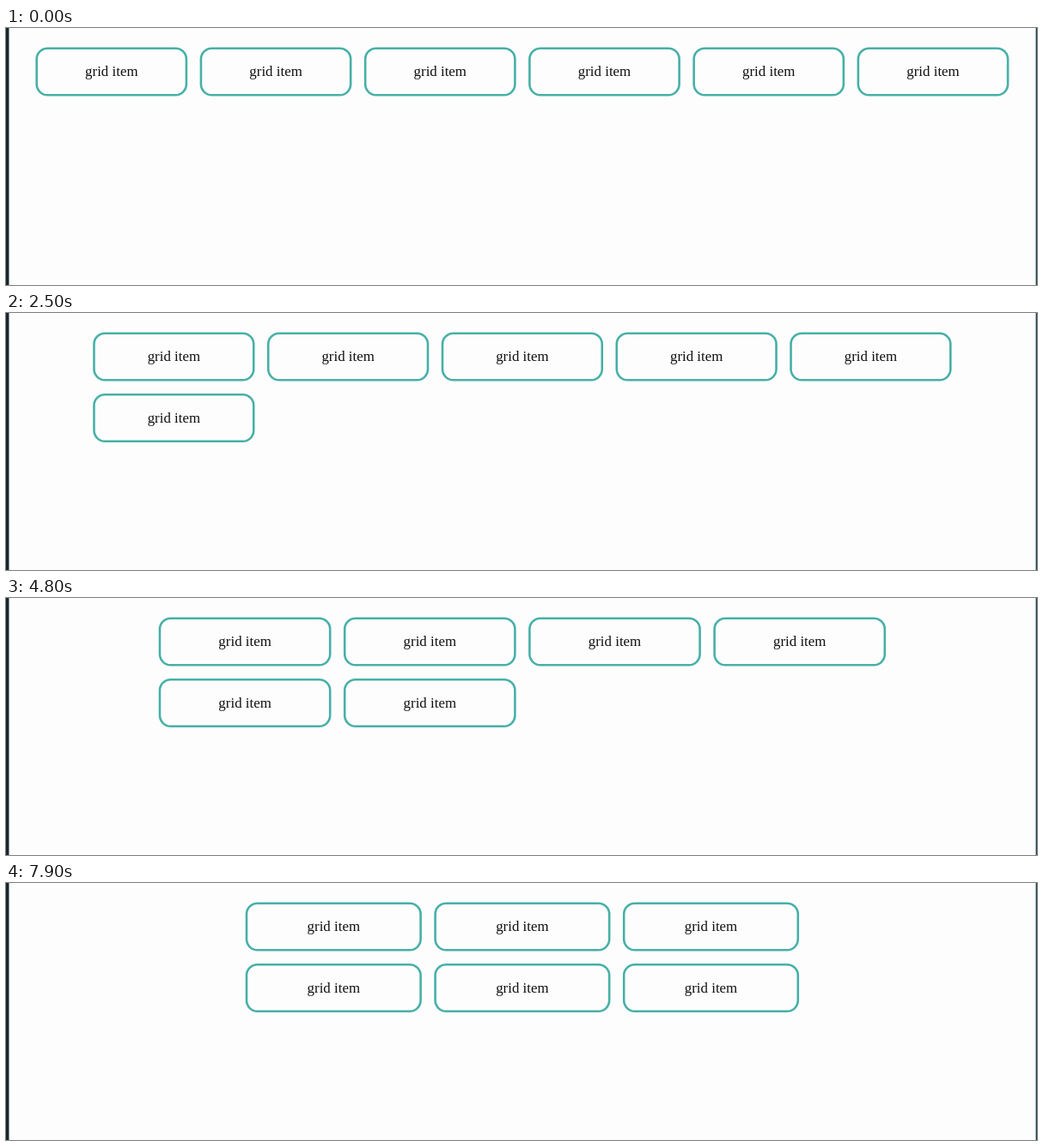
Write an HTML page with a canvas that moves like this. It is 1200 px wide and 300 px high and loops after 8000 ms.

```html
<!DOCTYPE html>
<html lang="en">
<head>
<meta charset="utf-8">
<title>Auto-fit grid</title>
<style>
  html, body { margin: 0; width: 100%; height: 100%; overflow: hidden; background: #fefdfe; }
  canvas { display: block; width: 1200px; height: 300px; }
</style>
</head>
<body>
<canvas id="stage" width="1200" height="300"></canvas>
<script>
const ctx = document.getElementById('stage').getContext('2d');

const LOOP = 8000, TICK = 100;
const ITEMS = 6, MIN_WIDTH = 172.8, GAP = 14.4;
const CENTER = 600.9, TOP = 22.4, HEIGHT = 57.2, ROW = 71.5;
const BORDER = 2.6, RADIUS = 14;

// Ticks on which the resize pauses
const PAUSES = [9, 10, 16, 45, 47, 59, 76];

// [moved ticks, half the container width]
const PATH = [
  [0, 566.5], [16, 519.2], [29, 477], [43, 423.2],
  [53, 387.2], [60, 363.7], [72, 322.2]
];

function halfWidth(tick) {
  const moved = tick - PAUSES.filter(p => p <= tick).length;
  const i = Math.max(1, PATH.findIndex(([step]) => step >= moved));
  const [s0, w0] = PATH[i - 1];
  const [s1, w1] = PATH[i];
  return w0 + (w1 - w0) * (moved - s0) / (s1 - s0);
}

function drawItem(x, y, width) {
  const inset = BORDER / 2;
  ctx.beginPath();
  ctx.roundRect(x + inset, y + inset, width - BORDER, HEIGHT - BORDER, RADIUS - inset);
  ctx.stroke();
  ctx.fillText('grid item', x + width / 2, y + 33.8);
}

function draw(tick) {
  ctx.fillStyle = '#fefdfe';
  ctx.fillRect(0, 0, 1200, 300);

  // Window edges
  ctx.fillStyle = '#17262a';
  ctx.fillRect(0, 0, 3, 300);
  ctx.fillStyle = '#8b9698';
  ctx.fillRect(3, 0, 1, 300);
  ctx.fillStyle = '#1d4048';
  ctx.fillRect(1198.6, 0, 1.4, 300);

  ctx.strokeStyle = '#47b0a7';
  ctx.lineWidth = BORDER;
  ctx.fillStyle = '#111';
  ctx.font = '16.9px "Liberation Serif", serif';
  ctx.textAlign = 'center';

  const half = halfWidth(tick);
  const span = 2 * half + GAP;
  const columns = Math.min(ITEMS, Math.floor(span / (MIN_WIDTH + GAP)));
  const pitch = span / columns;
  for (let i = 0; i < ITEMS; i++) {
    const x = CENTER - half + (i % columns) * pitch;
    drawItem(x, TOP + Math.floor(i / columns) * ROW, pitch - GAP);
  }
}

const start = performance.now();
function frame() {
  const time = (performance.now() - start) % LOOP;
  draw(Math.floor(time / TICK));
  requestAnimationFrame(frame);
}
frame();
</script>
</body>
</html>
```
